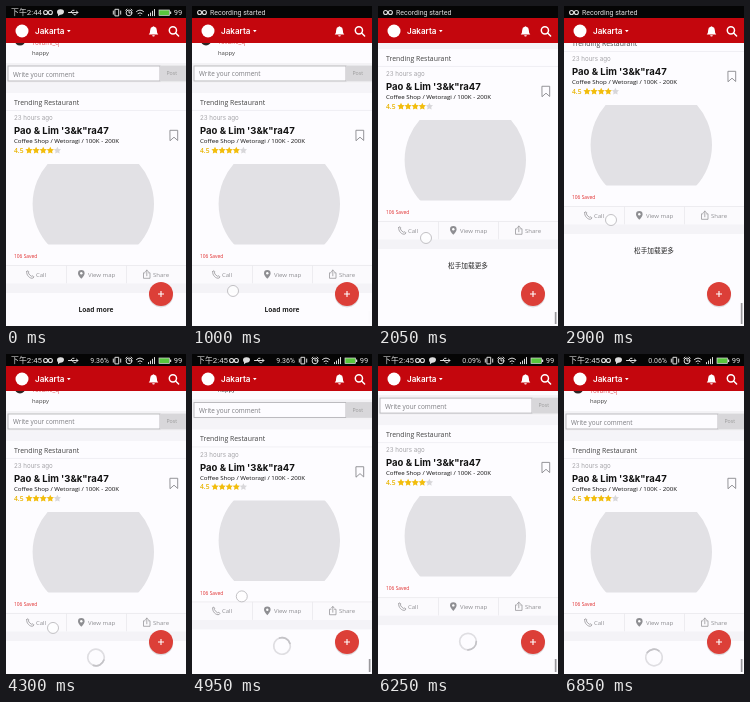
Recreate the animation shown at these times as an HTML page. Size 180x320 px, loop 6900 ms.

```html
<!DOCTYPE html>
<html lang="en">
<head>
<meta charset="utf-8">
<title>Pull up to load more</title>
<style>
  html, body { margin: 0; width: 100%; height: 100%; overflow: hidden; background: #fdfcff; }
  svg { display: block; width: 100%; height: 100%; font-family: "Open Sans", "Noto Sans CJK SC", "Noto Sans CJK", sans-serif; }
  .display { font-family: Inter, sans-serif; }
  .status { font-family: Roboto, "Noto Sans CJK SC", "Noto Sans CJK", sans-serif; font-size: 7px; fill: #ddd; }
  .line { fill: none; stroke-linecap: round; stroke-linejoin: round; }
  .muted { fill: #8e8e92; font-size: 6px; }
</style>
</head>
<body>
<svg viewBox="0 0 180 320" preserveAspectRatio="none">
  <defs>
    <clipPath id="barClip"><rect width="180" height="12"/></clipPath>
    <clipPath id="photoClip"><rect y="158" width="180" height="80.5"/></clipPath>
    <g id="goggles" class="line" stroke="#ddd" stroke-width="1.1">
      <circle cx="-2.4" r="2"/><circle cx="2.4" r="2"/>
    </g>
  </defs>
  <rect width="180" height="320" fill="#fdfcff"/>

  <g id="page">
    <circle cx="14" cy="34" r="5.5" fill="#2b2523"/>
    <text x="26" y="38.5" font-size="6.2" fill="#e0575b">Tovami_q</text>
    <text x="26" y="49.3" font-size="5.9" fill="#444">happy</text>
    <rect y="57" width="180" height="20.5" fill="#f3f2f5"/>
    <rect x="2" y="60" width="152" height="15" fill="#fdfcff" stroke="#b5b4b8" stroke-width=".9"/>
    <rect x="154" y="59.6" width="26" height="15.8" fill="#d8d7da"/>
    <text x="160.5" y="69.4" font-size="5.2" fill="#999">Post</text>
    <text x="7" y="70.5" font-size="6.4" fill="#7c7c80">Write your comment</text>
    <rect y="77.5" width="180" height="9.5" fill="#f5f4f8"/>
    <text x="8" y="98.9" font-size="6.9" fill="#444">Trending Restaurant</text>
    <path d="M0 104.5H180" stroke="#eeedf1" stroke-width=".8"/>
    <text class="display" x="8" y="114.3" font-size="6.2" fill="#a5a4a8">23 hours ago</text>
    <text class="display" x="8" y="128.2" font-size="9.5" font-weight="700" fill="#111">Pao &amp; Lim '3&amp;k"ra47</text>
    <text x="8" y="137.3" font-size="6.15" fill="#111">Coffee Shop / Wetoragi / 100K - 200K</text>
    <text x="8" y="147" font-size="6.7" font-weight="600" fill="#e8b400">4.5</text>
    <g id="stars"></g>
    <path class="line" d="M164.3 124.3h7.400v10.200l-3.700-3.300-3.700 3.300z" stroke="#8a8a8e" stroke-width=".9"/>
    <circle cx="87.300" cy="198" r="60.700" fill="#e2e1e5" clip-path="url(#photoClip)"/>
    <text x="8" y="252.300" font-size="4.900" fill="#e02b2b">106 Saved</text>

    <rect y="259.500" width="180" height="18" fill="#fbfafd"/>
    <path d="M0 259.500H180M60.500 259.500v18M120.500 259.500v18" stroke="#eae9ed" stroke-width=".8"/>
    <rect y="277.500" width="180" height="9.500" fill="#f4f3f7"/>
    <path class="line" d="M20.800 265.400q1-1.700 2 .3l-.4 1.300q1 2.300 3.200 3.300l1.300-.5q1.900 1 .3 2.200c-3 1.400-7.600-3.200-6.400-6.600z" stroke="#98979b" stroke-width=".8"/>
    <path d="M75.300 272.800q-3.300-3.700-3.300-5.400a3.300 3.300 0 0 1 6.600 0q0 1.700-3.300 5.400z" fill="#8e8e92"/>
    <circle cx="75.300" cy="267.300" r="1.200" fill="#fff"/>
    <path class="line" d="M139 266.800h-1.500v5.500h6.500v-5.500h-1.500M140.800 269.800v-5.700m-1.500 1.500 1.500-1.500 1.500 1.500" stroke="#98979b" stroke-width=".8"/>
    <text class="muted" x="30" y="270.700">Call</text>
    <text class="muted" x="82" y="270.700">View map</text>
    <text class="muted" x="147" y="270.700">Share</text>

    <text id="hint" x="90" y="306.300" text-anchor="middle" fill="#222"></text>
    <g id="spinner" class="line" stroke-width="1.700">
      <circle r="8.300" stroke="#dfdee2"/>
      <path d="M0-8.300A8.300 8.300 0 0 1 8.300 0" stroke="#c4c3c7"/>
    </g>
  </g>

  <rect id="thumb" x="176.800" width="1.700" fill="#99989c"/>
  <g>
    <circle cx="155" cy="289.200" r="12.200" fill="#000" opacity=".12"/>
    <circle cx="155" cy="288" r="12" fill="#dc3f38"/>
    <path d="M152 288h6m-3-3v6" stroke="#fff" stroke-width="1.100"/>
  </g>

  <rect y="12" width="180" height="25" fill="#c4060d"/>
  <circle cx="16" cy="25" r="6.500" fill="#fff"/>
  <text class="display" x="29" y="28" font-size="8.100" font-weight="600" fill="#fff">Jakarta</text>
  <path d="M61 24h3.600l-1.800 2.200z" fill="#fff"/>
  <path d="M142.700 28.600q1.500-1 1.500-4.600a3.300 3.300 0 0 1 2.500-3.200a.85.85 0 0 1 1.600 0a3.300 3.300 0 0 1 2.500 3.200q0 3.600 1.500 4.600zM146.200 29.300h2.600a1.300 1.300 0 0 1-2.600 0z" fill="#fff"/>
  <g class="line" stroke="#fff" stroke-width="1.500"><circle cx="166.900" cy="24.300" r="3.600"/><path d="m169.600 27 3 3"/></g>

  <rect width="180" height="12" fill="#050505"/>
  <g clip-path="url(#barClip)">
    <g id="normalBar" class="status">
      <text id="clock" x="5" y="9.300" font-size="7.900"></text>
      <use href="#goggles" x="42" y="6.500"/>
      <path d="M51 6a3.500 2.700 0 1 1 3 2.700l-2 1.500v-2q-1-.8-1-2.200z"/>
      <g class="line" stroke="#ddd" stroke-width="1">
        <path d="M62.500 6.500h9.500m-1.500-1.300 1.500 1.300-1.500 1.300M64.500 6.500l2-2.200h1.500M66 6.500l2 2.200h1.500"/>
        <rect x="109.300" y="3.300" width="3.400" height="6.600"/>
        <path d="M107.300 5v3.200M114.700 5v3.200"/>
        <circle cx="123" cy="6.900" r="2.900"/>
        <path d="M123 5.400v1.500h1.300M119.800 4.200l1.200-1M126.200 4.200l-1.200-1"/>
        <path d="M130.500 5.500q3.500-3 7 0M132 7.500q2-1.700 4 0M134 9.500v.1"/>
        <path d="M142.500 9.700v-1.200M144.500 9.700v-2.700M146.500 9.700v-4.500M148.500 9.700v-6.200"/>
      </g>
      <rect x="153" y="4" width="10.500" height="5.500" fill="#58c63d" stroke="#ddd" stroke-width=".7"/>
      <path d="M164 5.600h1.200v2.300h-1.200z"/>
      <text id="rate" x="103" y="9.100" text-anchor="end"></text>
      <text x="167.800" y="9.300" font-size="7.600">99</text>
    </g>
    <g id="tickerBar" class="status">
      <use href="#goggles" x="10" y="6.500"/>
      <text x="18" y="9.200">Recording started</text>
    </g>
  </g>
  <circle id="touch" r="5.500" fill="#fff" fill-opacity=".7" stroke="#b4b3b7" stroke-width=".8"/>
</svg>

<script>
const LOOP = 6900;
const $ = id => document.getElementById(id);

// Each row: time, value(s); values are interpolated linearly.
const scrollPath = [[1000, 0], [1150, 3], [1500, 22], [2050, 44], [2500, 54], [2900, 59], [3100, 59],
  [3200, 35], [3300, 14], [3420, 3], [3500, 0], [4300, 0], [4700, 7], [5250, 17], [5750, 25],
  [6150, 28], [6250, 16], [6350, 6], [6500, 0]];
const firstDrag = [[1000, 41, 285], [1500, 45, 258], [2050, 48, 232], [2500, 47, 220], [2900, 47, 214], [3100, 47, 214]];
const secondDrag = [[4200, 47, 276], [4300, 47, 274], [5000, 50, 240], [5750, 52, 215], [6150, 52, 208]];
const thumbPath = [[1050, 305, 13], [2050, 306, 12], [2900, 297, 21], [3100, 297, 21], [3500, 305, 13]];
const thumbFade = [[1000, 0], [1050, 1], [3500, 1], [3800, 0], [4350, 0], [4400, 1], [6900, 1]];

function sample(rows, t) {
  const next = rows.findIndex(row => row[0] > t);
  if (next === 0) return rows[0].slice(1);
  if (next < 0) return rows[rows.length - 1].slice(1);
  const a = rows[next - 1], b = rows[next];
  const k = (t - a[0]) / (b[0] - a[0]);
  return a.slice(1).map((v, i) => v + (b[i + 1] - v) * k);
}

const progress = (t, from, to) => Math.min(1, Math.max(0, (t - from) / (to - from)));
const easeOut = k => 1 - (1 - k) ** 2;

function star(cx, cy, r, fill) {
  const points = Array.from({ length: 10 }, (_, i) => {
    const a = i * Math.PI / 5 - Math.PI / 2, d = i % 2 ? r * .5 : r;
    return `${cx + d * Math.cos(a)},${cy + d * Math.sin(a)}`;
  });
  return `<polygon points="${points.join(' ')}" fill="${fill}"/>`;
}

$('stars').innerHTML = Array.from({ length: 5 }, (_, i) =>
  star(23 + i * 7.1, 144.5, 3.8, i < 4 ? '#f2bd0c' : '#d8d7da')).join('');

function place(id, y, opacity) {
  $(id).setAttribute('transform', `translate(0 ${y})`);
  $(id).setAttribute('opacity', opacity);
}

function drawStatus(t) {
  const enter = easeOut(progress(t, 50, 400));
  const leave = easeOut(progress(t, 3300, 3650));
  if (t < 3300) {
    place('normalBar', -14 * enter, 1 - enter);
    place('tickerBar', 14 * (1 - enter), enter);
  } else {
    place('normalBar', -14 * (1 - leave), leave);
    place('tickerBar', 14 * leave, 1 - leave);
  }
  $('clock').textContent = t < 1000 ? '下午2:44' : '下午2:45';
  $('rate').textContent = t < 1000 ? '' : t < 5500 ? '9.36%' : t < 6650 ? '0.09%' : '0.06%';
}

function drawFooter(t, scroll) {
  const loading = t >= 3100;
  const armed = scroll > 30;
  const hint = $('hint');
  hint.textContent = loading ? '' : armed ? '松手加载更多' : 'Load more';
  hint.setAttribute('font-size', armed ? 6.67 : 6.6);
  hint.setAttribute('font-weight', armed ? 400 : 700);
  $('spinner').setAttribute('visibility', loading ? 'visible' : 'hidden');
  $('spinner').setAttribute('transform', `translate(90 303.5) rotate(${t * .36 % 360})`);
}

function drawTouch(t) {
  const first = t >= 1000 && t < 3100, second = t >= 4200 && t < 6150;
  const [x, y] = sample(t < 3600 ? firstDrag : secondDrag, t);
  const touch = $('touch');
  touch.setAttribute('visibility', first || second ? 'visible' : 'hidden');
  touch.setAttribute('cx', x);
  touch.setAttribute('cy', y);
}

function draw(t) {
  const [scroll] = sample(scrollPath, t);
  $('page').setAttribute('transform', `translate(0 ${-scroll})`);
  const [y, height] = sample(thumbPath, t);
  $('thumb').setAttribute('y', y);
  $('thumb').setAttribute('height', height);
  $('thumb').setAttribute('opacity', sample(thumbFade, t)[0]);
  drawStatus(t);
  drawFooter(t, scroll);
  drawTouch(t);
}

const start = performance.now();
function tick() {
  draw((performance.now() - start) % LOOP);
  requestAnimationFrame(tick);
}
tick();
</script>
</body>
</html>
```
